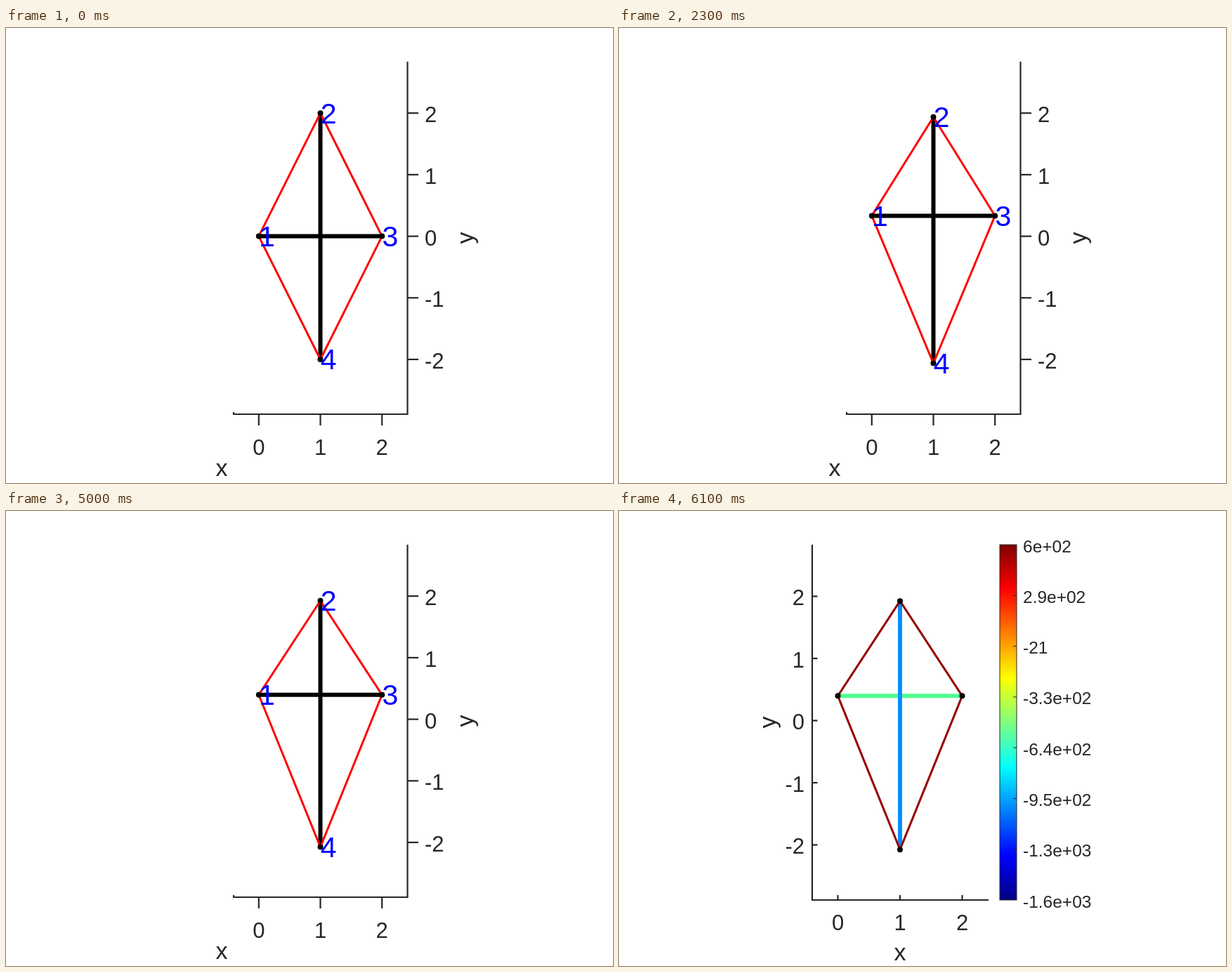
Animation, 864 px wide and 648 px high, one loop 6120 ms. Source, as an HTML page:

```html
<!DOCTYPE html>
<html lang="en">
<head>
<meta charset="utf-8">
<title>Tensegrity cross</title>
<style>
html, body { margin: 0; width: 100%; height: 100%; overflow: hidden; background: #fff; }
svg { display: block; width: 100vw; height: 100vh; }
text { font-family: "Liberation Sans", Arial, sans-serif; fill: #262626; }
</style>
</head>
<body>
<svg id="stage" viewBox="0 0 864 648">
  <defs>
    <linearGradient id="jet" x1="0" y1="1" x2="0" y2="0">
      <stop offset="0" stop-color="#000084"/>
      <stop offset=".125" stop-color="#00f"/>
      <stop offset=".375" stop-color="#0ff"/>
      <stop offset=".625" stop-color="#ff0"/>
      <stop offset=".875" stop-color="#f00"/>
      <stop offset="1" stop-color="#800000"/>
    </linearGradient>
  </defs>
</svg>
<script>
const STEPS = 51, SLOW = 100, FAST = 20;
const LOOP = STEPS * (SLOW + FAST);
const INK = "#262626";
const stage = document.getElementById("stage");

function add(parent, tag, attrs, content) {
  const el = document.createElementNS("http://www.w3.org/2000/svg", tag);
  set(el, attrs);
  if (content !== undefined) el.textContent = content;
  parent.appendChild(el);
  return el;
}

function set(el, attrs) {
  for (const k in attrs) el.setAttribute(k, attrs[k]);
}

function label(parent, str, x, y, size, anchor = "start") {
  return add(parent, "text", { x, y, "font-size": size, "text-anchor": anchor }, str);
}

function axisPath(parent, d) {
  add(parent, "path", { d, fill: "none", stroke: INK, "stroke-width": 2.2 });
}

function sideName(parent, x, y) {
  const el = label(parent, "y", 0, 0, 34, "middle");
  el.setAttribute("transform", `translate(${x} ${y}) rotate(-90)`);
}

// A plot holds two bars, four strings and four nodes in data coordinates.
function makePlot(view) {
  const g = add(stage, "g", {});
  const line = (stroke, width) => add(g, "line", { stroke, "stroke-width": width });
  const axes = add(g, "g", {});
  const links = [
    [0, 2, line(view.across, 6)],
    [1, 3, line(view.upright, 6)],
    ...[0, 1, 2, 3].map(k => [k, (k + 1) % 4, line(view.string, 3)])
  ];
  const dots = [0, 1, 2, 3].map(() => add(g, "circle", { r: 4 }));
  const tags = view.tagged ? dots.map((_, k) => {
    const el = label(g, k + 1, 0, 0, 41);
    el.style.fill = "#00f";
    return el;
  }) : [];
  const px = x => view.x0 + x * view.unit;
  const py = y => view.y0 - y * view.unit;

  function pose(rise, drop) {
    const pts = [[0, rise], [1, 2 - drop], [2, rise], [1, -2 - drop]]
      .map(([x, y]) => [px(x), py(y)]);
    for (const [a, b, el] of links)
      set(el, { x1: pts[a][0], y1: pts[a][1], x2: pts[b][0], y2: pts[b][1] });
    pts.forEach(([x, y], k) => {
      set(dots[k], { cx: x, cy: y });
      if (tags[k]) set(tags[k], { x: x + 0.3, y: Math.round(y + 14.4) });
    });
  }
  return { g, axes, px, py, pose };
}

const shape = makePlot({
  x0: 359.8, y0: 296.6, unit: 87.7, tagged: true,
  across: "#000", upright: "#000", string: "#f00"
});
axisPath(shape.axes, "M324 547V550H571.5V48");
for (let v = -2; v <= 2; v++) {
  const y = shape.py(v);
  axisPath(shape.axes, `M571 ${y}h16`);
  label(shape.axes, v, 596, y + 13, 31);
  if (v < 0) continue;
  const x = shape.px(v);
  axisPath(shape.axes, `M${x} 550v16`);
  label(shape.axes, v, x, 608, 31, "middle");
}
label(shape.axes, "x", 307, 638, 34, "middle");
sideName(shape.axes, 665.3, 299);

const force = makePlot({
  x0: 311.5, y0: 298.5, unit: 88.5, tagged: false,
  across: "#50ff90", upright: "#0090ff", string: "#960000"
});
axisPath(force.axes, "M275 48V554H526");
for (let v = -2; v <= 2; v++) {
  const y = force.py(v);
  axisPath(force.axes, `M275 ${y}h7.5`);
  label(force.axes, v, 264, y + 12.7, 31, "end");
  if (v < 0) continue;
  const x = force.px(v);
  axisPath(force.axes, `M${x} 554v-7`);
  label(force.axes, v, x, 597, 31, "middle");
}
label(force.axes, "x", 400, 640, 34, "middle");
sideName(force.axes, 222.7, 301);

add(force.axes, "rect", {
  x: 542, y: 48, width: 24, height: 506,
  fill: "url(#jet)", stroke: INK, "stroke-width": 1
});
["6e+02", "2.9e+02", "-21", "-3.3e+02", "-6.4e+02", "-9.5e+02", "-1.3e+03", "-1.6e+03"]
  .forEach((str, k) => {
    const y = 48 + k * 506 / 7;
    if (k % 7) add(force.axes, "path", { d: `M566 ${y}h-5`, stroke: INK, "stroke-width": 1 });
    label(force.axes, str, 575, y + 10.6, 24.5);
  });

// Critically damped approach to rest.
function settle(step) {
  const p = 0.14 * step;
  return 1 - (1 + p) * Math.exp(-p);
}

function draw(now) {
  const t = now % LOOP;
  const split = STEPS * SLOW;
  const first = t < split;
  const step = first ? Math.floor(t / SLOW) : Math.floor((t - split) / FAST);
  const s = settle(step);
  shape.g.style.display = first ? "" : "none";
  force.g.style.display = first ? "none" : "";
  (first ? shape : force).pose(0.4 * s, 0.0755 * s);
}

function tick() {
  draw(performance.now());
  requestAnimationFrame(tick);
}
tick();
</script>
</body>
</html>
```
